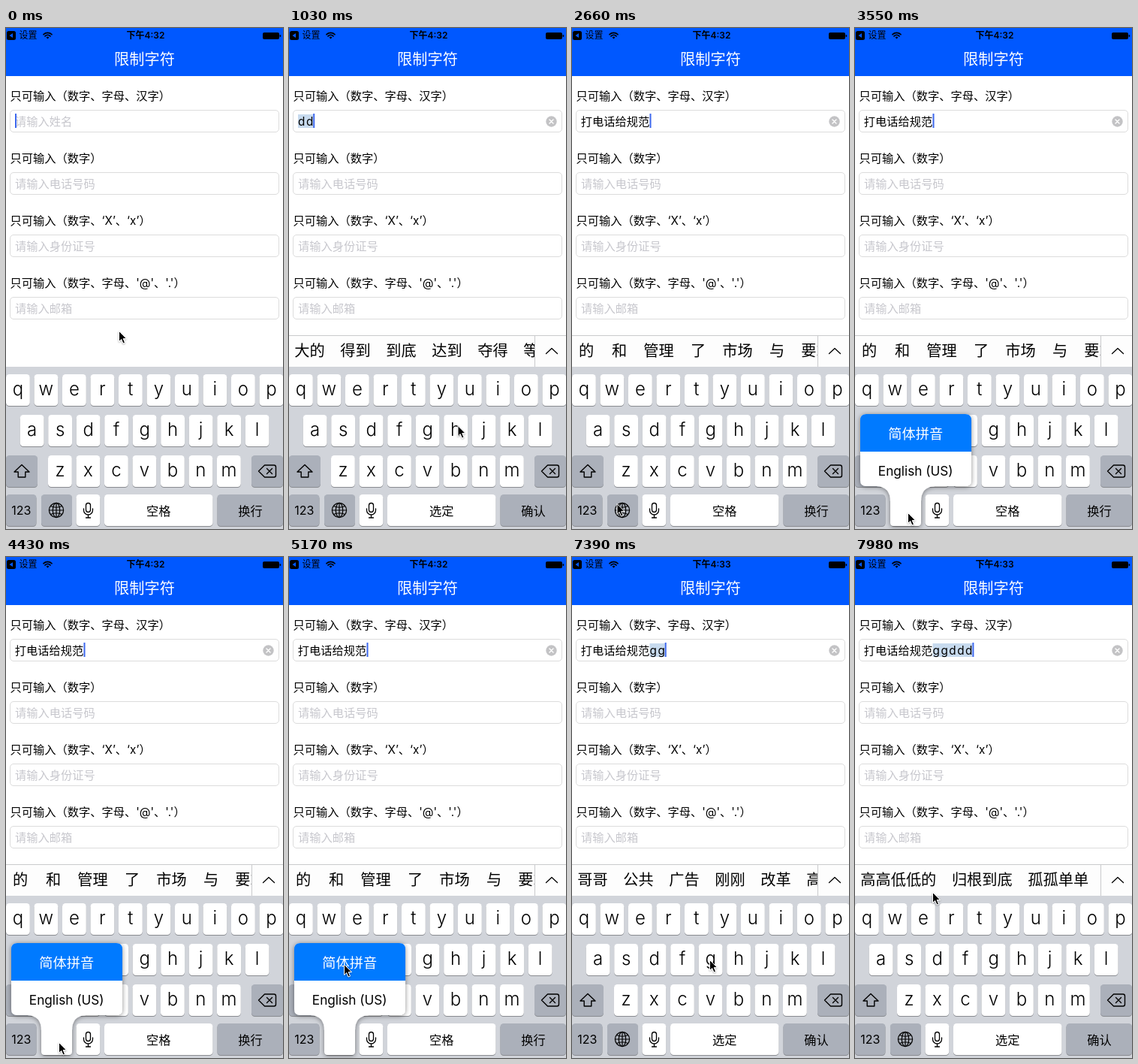
An HTML page that plays this animation: 369x667 px, repeating every 8 s.

```html
<!DOCTYPE html>
<html lang="zh-CN">
<head>
<meta charset="utf-8">
<style>
  html, body { margin: 0; width: 100%; height: 100%; overflow: hidden; background: #fff; }
  svg { display: block; width: 369px; height: 667px; font-family: Inter, "Noto Sans CJK SC", "Noto Sans CJK", sans-serif; }
  text { white-space: pre; }
</style>
</head>
<body>
<svg id="stage" viewBox="0 0 369 667"></svg>
<script>
const LOOP = 8000, TICK = 147.9;
const stage = document.getElementById('stage');

const text = (s, x, y, size, fill = '#000', extra = '') =>
  `<text x="${x}" y="${y}" font-size="${size}" fill="${fill}" ${extra}>${s}</text>`;
const mid = (s, x, y, size, fill, extra = '') => text(s, x, y, size, fill, 'text-anchor="middle" ' + extra);
const rect = (x, y, w, h, fill, extra = '') =>
  `<rect x="${x}" y="${y}" width="${w}" height="${h}" fill="${fill}" ${extra}/>`;
const line = (d, width = 1.4, color = '#000') =>
  `<path d="${d}" fill="none" stroke="${color}" stroke-width="${width}" stroke-linejoin="round" stroke-linecap="round"/>`;

const GREY = '#abb0ba', COMMITTED = '打电话给规范', EM = 15.25, PITCH = 10.9;

const fields = [
  ['只可输入（数字、字母、汉字）', '请输入姓名'],
  ['只可输入（数字）', '请输入电话号码'],
  ['只可输入（数字、‘X’、‘x’）', '请输入身份证号'],
  ["只可输入（数字、字母、'@'、'.'）", '请输入邮箱']
];

// tick, committed text, text being composed, candidates (null: no bar)
const typing = [
  [0, '', '', null],
  [5, '', 'd', '的 到 都 多 大 对 等 但'],
  [6, '', 'dd', '大的 得到 到底 达到 夺得 等待'],
  [8, '', 'ddh', '打电话 大的 得到 到底 达到 夺得'],
  [10, '', 'ddhg', '打电话给 打电话 大的 得到 到底'],
  [11, '', 'ddhgg', '打电话给 打电话 大的 得到 到底'],
  [13, '', 'ddhggf', '打电话给规范 打电话给 打电话 大的'],
  [16, COMMITTED, '', ''],
  [17, COMMITTED, '', '的 和 管理 了 市场 与 要求'],
  [49, COMMITTED, 'g', '个 给 过 高 该 更 跟 国'],
  [50, COMMITTED, 'gg', '哥哥 公共 广告 刚刚 改革 高贵'],
  [52, COMMITTED, 'ggd', '高高的 刚刚的 广告的 公共的'],
  [53, COMMITTED, 'ggdd', '归根到底 高高低低 孤孤单单 等等'],
  [54, COMMITTED, 'ggddd', '高高低低的 归根到底 孤孤单单']
];

// tick, x, y
const mouse = [
  [0, 150, 403], [1, 149, 410], [3, 120, 500], [4, 110, 530], [6, 109, 531], [7, 224.5, 529],
  [8, 220, 531], [9, 186, 533], [11, 186, 535], [12, 150, 533], [13, 147, 534], [14, 100, 470],
  [15, 60, 430], [16, 58, 432], [17, 58, 540], [18, 59.5, 633], [20, 68, 648], [24, 70, 645],
  [31, 70, 646], [32, 70, 628], [33, 72, 588], [34, 73, 556], [35, 73, 542], [36, 73, 542],
  [37, 74, 542], [38, 74, 542], [44, 81, 531.5], [45, 81, 531.5], [46, 120, 533], [48, 184, 535],
  [50, 183, 536], [51, 130, 540], [52, 108, 545], [53, 108, 553], [54, 103, 446]
];

const within = (n, a, b) => n >= a && n < b;

function pointer(n) {
  const i = Math.max(1, mouse.findIndex(p => p[0] >= n));
  const [a, b] = [mouse[i - 1], mouse[i]];
  const k = (n - a[0]) / (b[0] - a[0]);
  return [a[1] + (b[1] - a[1]) * k, a[2] + (b[2] - a[2]) * k];
}

function header(n) {
  return rect(0, 0, 369, 64, '#0058ff') +
    rect(1, 4, 12, 12, '#000', 'rx="2.5"') + '<path d="M9 7V13L4.5 10Z" fill="#0058ff"/>' +
    text('设置', 17.5, 14.3, 12) +
    line('M50 8.6a8 8 0 0 1 11 0M52 10.9a5 5 0 0 1 7 0', 1.7) + '<path d="M53.6 12.4a2.7 2.7 0 0 1 3.8 0L55.5 14.5Z"/>' +
    mid(`下午4:${n < 41 ? 32 : 33}`, 186, 14.3, 12, '#000', 'font-weight="600"') +
    rect(342, 6, 22, 9, '#000', 'rx="2"') + rect(364.6, 9, 1.6, 3, '#000', 'rx=".8"') +
    mid('限制字符', 184.5, 49, 20.2, '#fff');
}

function form(n, done, marked) {
  let out = fields.map(([label, hint], i) => {
    const y = 83 * i, filled = i === 0 && (done || marked);
    return text(label, 5.5, 96 + y, EM) +
      rect(5.5, 109.5 + y, 358, 29, '#fff', 'rx="4.5" stroke="#dcdcdc"') +
      (filled ? '' : text(hint, 12, 129.5 + y, EM, '#c7c7cd'));
  }).join('');
  const start = 12 + done.length * EM;
  const end = start + (marked ? (marked.length - 1) * PITCH + 9.3 : 0);
  if (marked) {
    const xs = [...marked].map((c, i) => start + i * PITCH).join(' ');
    out += rect(start, 115, end - start, 18, '#c7daee') + text(marked, xs, 129.5, EM);
  }
  out += text(done, 11.8, 129.5, EM);
  if (done || marked) {
    out += '<circle cx="349.5" cy="124.5" r="7.2" fill="#c3c3c5"/>' +
      line('M347 122l5 5m0-5l-5 5', 1.4, '#fff');
  }
  const hidden = within(n, 20, 23) || within(n, 43, 47);
  return hidden ? out : out + rect(end, 114, 2, 19, '#3d68ee');
}

function candidates(list) {
  if (list === null) return '';
  let out = rect(0, 409, 369, 42, '#fdfdfd') + rect(0, 409, 369, 1, '#c9cacc');
  if (!list) return out;
  let x = -3;
  out += '<g clip-path="url(#bar)">';
  for (const word of list.split(' ')) {
    const w = Math.max(44, word.length * 20.2 + 20.6);
    out += mid(word, x + w / 2, 437, 20.2);
    x += w;
  }
  return out + '</g>' + rect(327, 409, 1, 42, '#c9cacc') + line('M342.5 433.5L350 426.5L357.5 433.5', 1.3);
}

const key = (x, y, w, fill = '#fff') =>
  rect(x, y + 1, w, 42, '#898b90', 'rx="4.5"') + rect(x, y, w, 42, fill, 'rx="4.5"');

const letters = (row, x, y) => [...row].map((c, i) =>
  key(x + 37.5 * i, y, 31.8) + mid(c, x + 37.5 * i + 15.9, y + 28, 24, '#000', 'font-weight="300"')).join('');

function keyboard(composing) {
  return rect(0, 451, 369, 216, '#d1d4da') +
    letters('qwertyuiop', 0, 461) + letters('asdfghjkl', 18.75, 515) + letters('zxcvbnm', 56, 569) +
    key(0, 569, 42, GREY) + line('M21 581.5L31 591H25.8V598H16.2V591H11Z') +
    key(327, 569, 42, GREY) +
    line('M344.5 582H357q2.5 0 2.5 2.5V595.500q0 2.5-2.5 2.5H344.500L336.500 590ZM347.500 586.500l7 7m0-7l-7 7') +
    key(0, 621, 40.5, GREY) + mid('123', 20.3, 648, 16) +
    key(47, 621, 41, GREY) + globe() +
    key(93.5, 621, 31.8) + mic() +
    key(131, 621, 144.5) + mid(composing ? '选定' : '空格', 203.3, 648.5, 16.2) +
    key(281.5, 621, 87.5, GREY) + mid(composing ? '确认' : '换行', 325.5, 648.5, 16.2);
}

const globe = () =>
  `<g fill="none" stroke="#000" stroke-width="1.2"><circle cx="67" cy="642" r="9.6"/>
  <ellipse cx="67" cy="642" rx="4.7" ry="9.6"/>
  <path d="M67 632.400V651.600M57.400 642H76.600M59.500 636.500Q67 640 74.500 636.500M59.500 647.500Q67 644 74.500 647.500"/></g>`;

const mic = () => rect(106.5, 632.5, 6, 12, 'none', 'rx="3" stroke="#000" stroke-width="1.3"') +
  line('M103.500 640v2a6 6 0 0 0 12 0v-2M109.500 648v3.700M106.500 652h6', 1.3);

function languageMenu(n) {
  if (!within(n, 24, 39)) return '';
  const english = n === 33;
  const shape = 'M15 514H147Q155 514 155 522V602Q155 610 147 610H106Q88 611 88 630V658.5' +
    'Q88 663 83.5 663H51.5Q47 663 47 658.5V630Q47 611 29 610H15Q7 610 7 602V522Q7 514 15 514Z';
  return `<path d="${shape}" fill="#fff" filter="url(#soft)"/>` +
    (english
      ? '<path d="M7 564H155V602Q155 610 147 610H15Q7 610 7 602Z" fill="#007aff"/>'
      : '<path d="M7 564V522Q7 514 15 514H147Q155 514 155 522V564Z" fill="#007aff"/>') +
    mid('简体拼音', 80.7, 546.5, 18.2, english ? '#000' : '#fff') +
    mid('English (US)', 80.7, 596, 17.2, english ? '#fff' : '#000');
}

function arrow(n) {
  const [x, y] = pointer(n);
  return `<path transform="translate(${x} ${y})" d="M.5 .5V14.5L3.7 11.500L6 17L8.500 16L6.200 10.600H10.500Z"
    stroke="#fff" stroke-width="1" filter="url(#drop)"/>`;
}

const defs = `<defs><clipPath id="bar">${rect(0, 410, 327, 41, '#000')}</clipPath>
  <filter id="soft" x="-20%" y="-20%" width="140%" height="140%"><feDropShadow dx="0" dy="1" stdDeviation="3" flood-opacity=".45"/></filter>
  <filter id="drop" x="-50%" y="-50%" width="200%" height="200%"><feDropShadow dx="0" dy="1" stdDeviation=".8" flood-opacity=".35"/></filter></defs>`;

function scene(n) {
  const [, done, marked, list] = typing.filter(s => s[0] <= n).pop();
  return defs + rect(0, 0, 369, 667, '#fff') + header(n) + form(n, done, marked) +
    candidates(list) + keyboard(marked) + languageMenu(n) + arrow(n);
}

let shown = -1;
function frame(now) {
  const n = Math.min(54, Math.floor((now % LOOP + 8) / TICK));
  if (n !== shown) stage.innerHTML = scene(shown = n);
  requestAnimationFrame(frame);
}
frame(0);
</script>
</body>
</html>
```
